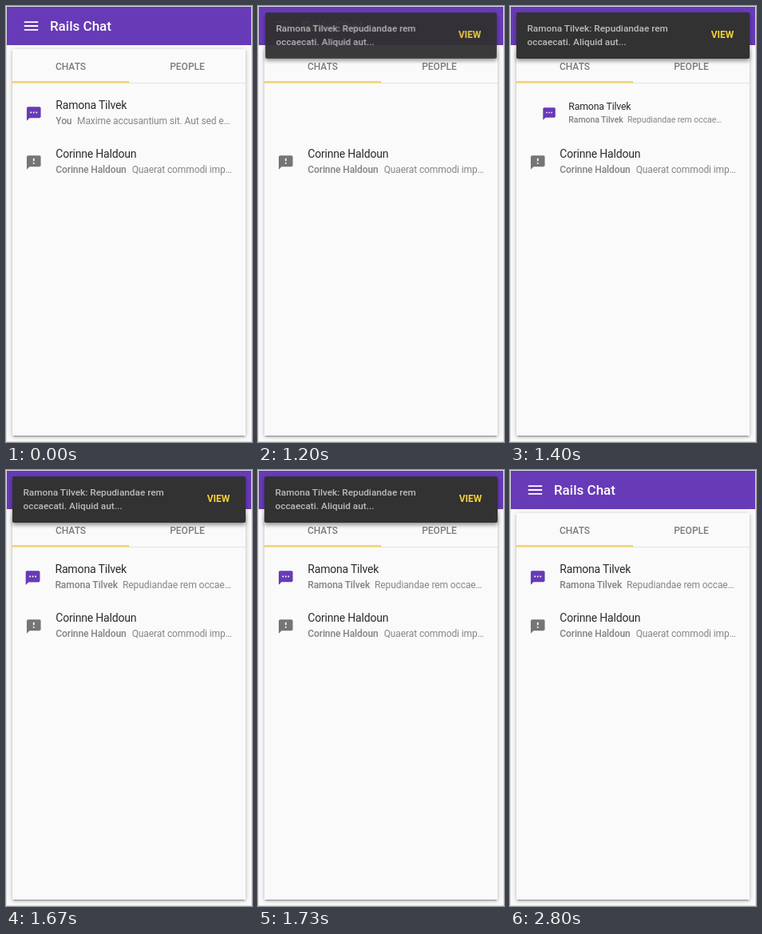
An HTML page for the animation above (2990 ms loop, 308 px wide and 546 px high).

```html
<!DOCTYPE html>
<html lang="en">
<head>
<meta charset="utf-8">
<title>Rails Chat</title>
<style>
  html, body { margin: 0; width: 100%; height: 100%; overflow: hidden; background: #fafafa; }
  body { position: relative; font-family: Roboto, Arial, sans-serif; }
  div, svg { position: absolute; box-sizing: border-box; }
  svg { left: 0; top: 0; overflow: visible; }
  #stage { left: 0; top: 0; width: 308px; height: 546px; overflow: hidden; }
  #bar { left: 0; top: 0; width: 308px; height: 49px; background: #673ab7; }
  #card { left: 8px; top: 54px; width: 292px; height: 484px; background: #fafafa;
    box-shadow: 0 3px 1px -2px rgba(0,0,0,.2), 0 2px 2px rgba(0,0,0,.14), 0 1px 6px rgba(0,0,0,.22); }
  #toast { left: 8px; top: 8px; width: 292px; height: 58px; border-radius: 2px; background: #323232;
    box-shadow: 0 3px 5px rgba(0,0,0,.4); opacity: 0; }
  #edge { inset: 0; border: 1px solid #dcdcdc; }
  text { white-space: pre; }
  .title { font-size: 17px; font-weight: 500; fill: #fff; }
  .tab { font-size: 12px; font-weight: 500; fill: #7c7c7c; text-anchor: middle; }
  .name { font-size: 14px; letter-spacing: -.2px; fill: #2b2b2b; }
  .from { font-size: 12px; letter-spacing: -.1px; font-weight: 500; fill: #828282; }
  .msg { font-size: 12px; letter-spacing: -.1px; fill: #868686; }
  .note { font-size: 11.8px; font-weight: 500; fill: #bcbcbc; }
  .view { font-size: 12px; font-weight: 600; fill: #f5d03a; }
  #fresh { transform-origin: 154px 135px; }
</style>
</head>
<body>
<div id="stage">
  <div id="bar"></div>
  <div id="card"></div>
  <svg width="308" height="546">
    <path fill="#fff" transform="translate(19.86 13.36) scale(.97)"
      d="M3 18h18v-2H3v2zm0-5h18v-2H3v2zm0-7v2h18V6H3z"/>
    <text class="title" x="55" y="31">Rails Chat</text>
    <text class="tab" x="81" y="80">CHATS</text>
    <text class="tab" x="227" y="80">PEOPLE</text>
    <rect x="8" y="96" width="292" height="1" fill="#e0e0e0"/>
    <rect x="8" y="94" width="146" height="2" fill="#ffd54f"/>
    <g id="old"></g>
    <g id="fresh"></g>
    <g id="other" transform="translate(0 61)"></g>
  </svg>
  <div id="toast">
    <svg width="292" height="58">
      <text class="note" x="13.5" y="24">Ramona Tilvek: Repudiandae rem</text>
      <text class="note" x="13.5" y="41">occaecati. Aliquid aut...</text>
      <text class="view" x="243.7" y="32">VIEW</text>
    </svg>
  </div>
  <div id="edge"></div>
</div>
<script>
const LOOP = 2990;
const $ = id => document.getElementById(id);

const bubble = "M20 2H4c-1.1 0-1.99.9-1.99 2L2 22l4-4h14c1.1 0 2-.9 2-2V4c0-1.1-.9-2-2-2z";
const dots = "M9 11H7V9h2v2zm4 0h-2V9h2v2zm4 0h-2V9h2v2z";
const alertMark = "m-7 12h-2v-2h2v2zm0-4h-2V6h2v4z";

function fillRow(id, color, mark, name, from, msgX, msg) {
  $(id).innerHTML = `
    <path fill="${color}" transform="translate(24.2 124.5) scale(.88)" d="${bubble}${mark}"/>
    <text class="name" x="62.3" y="129">${name}</text>
    <text class="from" x="62.3" y="148">${from}</text>
    <text class="msg" x="${msgX}" y="148">${msg}</text>`;
}

const first = "Ramona Tilvek", second = "Corinne Haldoun";
fillRow("old", "#673ab7", dots, first, "You", 89, "Maxime accusantium sit. Aut sed e…");
fillRow("fresh", "#673ab7", dots, first, first, 146, "Repudiandae rem occae…");
fillRow("other", "#757575", alertMark, second, second, 157.7, "Quaerat commodi imp…");

// Each step holds until the next: [ms, scale, opacity]
function play(id, steps) {
  const frames = steps.map(([ms, scale, opacity]) => ({
    offset: ms / LOOP, transform: `scale(${scale})`, opacity, easing: "step-end"
  }));
  frames.push({ ...frames[frames.length - 1], offset: 1 });
  const anim = $(id).animate(frames, { duration: LOOP, iterations: Infinity });
  anim.startTime = 0;
}

play("old", [[0, 1, 1], [1130, 1, 0]]);
play("fresh", [
  [0, 0, 0], [1270, .2, 1], [1330, .58, 1], [1400, .88, 1], [1470, 1.02, 1],
  [1530, 1.034, 1], [1600, 1.025, 1], [1670, 1.01, 1], [1730, 1, 1]
]);
play("toast", [
  [0, .8, 0], [1130, .905, .58], [1200, .992, .96], [1270, 1, 1], [2800, 1, 0]
]);
</script>
</body>
</html>
```
